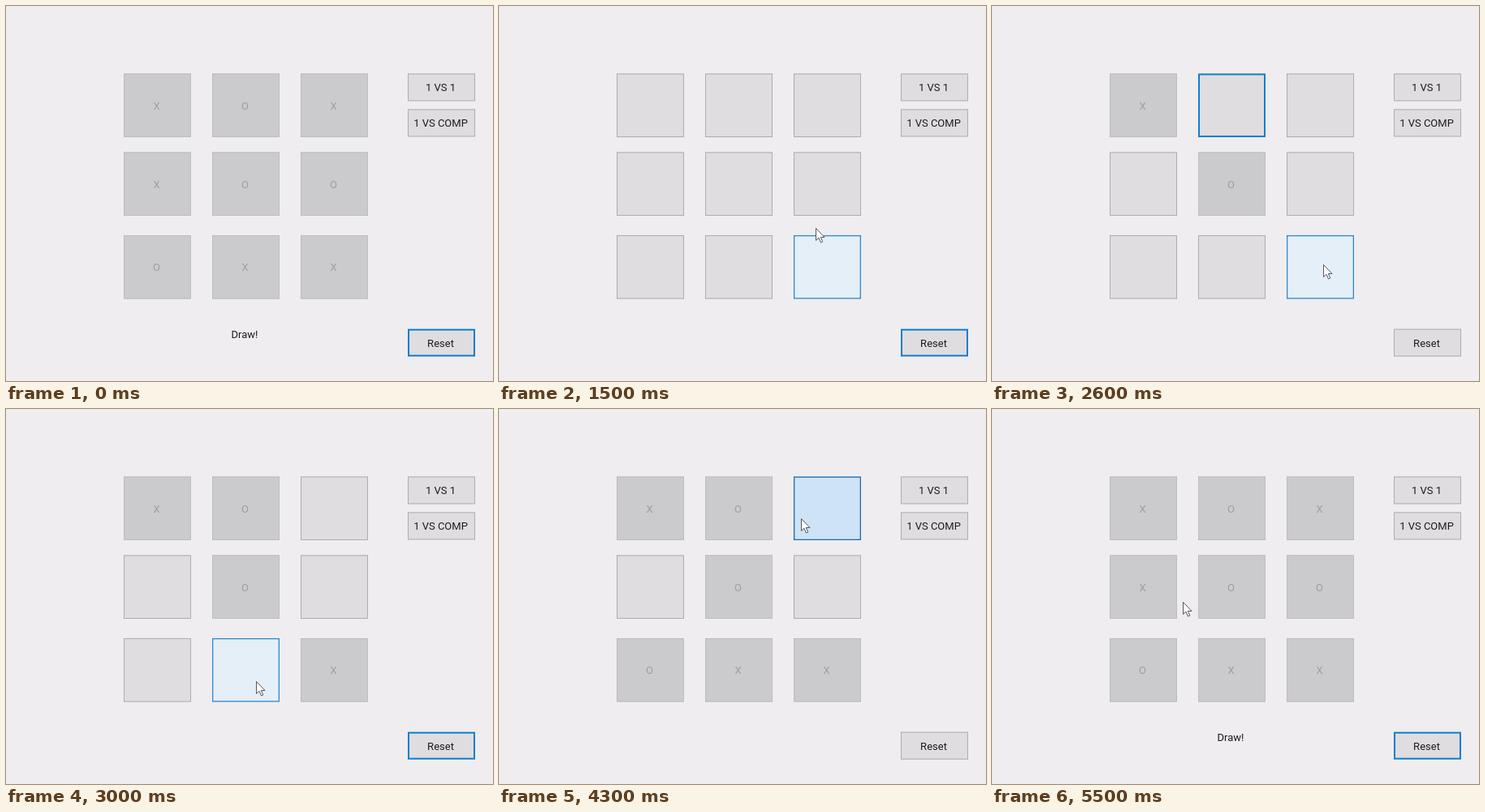
An HTML page with a canvas for the animation above (5600 ms loop, 600 by 463 pixels).

```html
<!DOCTYPE html>
<html lang="en">
<head>
<meta charset="utf-8">
<title>Tic-tac-toe</title>
<style>
  html, body { margin: 0; width: 100%; height: 100%; overflow: hidden; background: #efedef; }
  canvas { display: block; }
</style>
</head>
<body>
<canvas id="stage" width="600" height="463"></canvas>
<script>
const ctx = document.getElementById('stage').getContext('2d');
const LOOP = 5600, STEP = 100;
const POINTER_SHOWN = 700, CLEARED = 1300;
const RESET = 9;
const INK = '#1c1c1c', FADED = '#9f9ea0';

// Buttons 0-8 are the board, in tab order; Reset follows, then the two modes.
const buttons = [];
for (const y of [83.4, 180.4, 283])
  for (let col = 0; col < 3; col++)
    buttons.push({ x: 145 + 109 * col, y, w: 83, h: 78.6 });
const sideButton = (label, y) => buttons.push({ x: 495, y, w: 83, h: 34, label });
sideButton('Reset', 398.7);
sideButton('1 VS 1', 83.4);
sideButton('1 VS COMP', 127.4);

// The pointer eases to each stop; where it clicks, it stays until the release.
const stops = [
  { at: POINTER_SHOWN, x: 556, y: 383 },
  { at: 1200, x: 529, y: 420, press: 1200, button: RESET },
  { at: 1500, x: 390, y: 274 },
  { at: 1900, x: 160, y: 92, press: 2100, button: 0 },
  { at: 2600, x: 408, y: 319, press: 2700, button: 8 },
  { at: 3000, x: 308, y: 336, press: 3300, button: 7 },
  { at: 3500, x: 308, y: 336 },
  { at: 3800, x: 345, y: 300 },
  { at: 4300, x: 372, y: 135, press: 4300, button: 2 },
  { at: 5000, x: 196, y: 248, press: 5100, button: 3 },
  { at: 5500, x: 235, y: 238 }
];

const styles = {
  normal: { fill: '#dfdde0', line: '#adacae', width: 1 },
  disabled: { fill: '#cbcacc', line: '#bdbcbe', width: 1 },
  hover: { fill: '#e4eff8', line: '#2f88cc', width: 1.3 },
  pressed: { fill: '#cee3f5', line: '#1c6cab', width: 1.3 },
  focused: { fill: '#dfdde0', line: '#0f7ed0', width: 2 }
};

const lines = [0, 1, 2].flatMap(i => [[3 * i, 3 * i + 1, 3 * i + 2], [i, i + 3, i + 6]])
  .concat([[0, 4, 8], [2, 4, 6]]);

// The computer blocks a threat, else takes the centre, else the first free cell.
function replyTo(board) {
  const threat = lines.find(line =>
    line.filter(c => board[c] === 'X').length === 2 && line.some(c => !board[c]));
  if (threat) return threat.find(c => !board[c]);
  return board[4] ? board.indexOf('') : 4;
}

// Play the game once, keeping the board and focus after every click.
const clicks = [];
const board = Array(9).fill('');
for (const { press, button } of stops.filter(s => s.press)) {
  if (button !== RESET) {
    board[button] = 'X';
    const reply = replyTo(board);
    if (reply >= 0) board[reply] = 'O';
  }
  let focus = button;
  while (board[focus]) focus++;
  clicks.push({ press, button, focus, board: [...board] });
}

function pointerAt(t) {
  const i = stops.findIndex(s => s.at > t);
  if (i <= 0) return i ? stops.at(-1) : stops[0];
  const from = stops[i - 1], to = stops[i];
  const leave = from.press ? from.press + STEP : from.at;
  const k = Math.max(0, (t - leave) / (to.at - leave));
  const eased = 1 - (1 - k) ** 2;
  return {
    x: Math.round(from.x + (to.x - from.x) * eased),
    y: Math.round(from.y + (to.y - from.y) * eased)
  };
}

function drawText(text, x, baseline, color) {
  ctx.fillStyle = color;
  ctx.fillText(text, x, baseline);
}

function drawButton({ x, y, w, h, label }, state, mark) {
  const { fill, line, width } = styles[state];
  ctx.fillStyle = fill;
  ctx.fillRect(x, y, w, h);
  ctx.strokeStyle = line;
  ctx.lineWidth = width;
  ctx.strokeRect(x + width / 2, y + width / 2, w - width, h - width);
  if (label) drawText(label, x + w / 2 - 1, y + 22, INK);
  if (mark) drawText(mark, x + w / 2 - 1, y + 44.3, FADED);
}

function drawPointer({ x, y }) {
  ctx.save();
  ctx.translate(x + 0.5, y + 0.5);
  ctx.fillStyle = '#fff';
  ctx.strokeStyle = '#55555a';
  ctx.lineWidth = 1;
  const arrow = new Path2D('M0 0V15L3.5 11.8L6 17.5L8.3 16.5L5.8 11H10.5Z');
  ctx.fill(arrow);
  ctx.stroke(arrow);
  ctx.restore();
}

function render(t) {
  const click = clicks.findLast(c => c.press + STEP <= t);
  const pressed = clicks.find(c => c.press === t)?.button;
  const marks = t < CLEARED ? clicks.at(-1).board : click.board;
  const focus = pressed ?? click?.focus ?? RESET;
  // Hover highlighting trails the pointer by one step.
  const tip = pointerAt(t - STEP);

  ctx.fillStyle = '#efedef';
  ctx.fillRect(0, 0, 600, 463);
  ctx.font = '13px Roboto, sans-serif';
  ctx.textAlign = 'center';

  buttons.forEach((b, i) => {
    const over = tip.x >= b.x && tip.x < b.x + b.w && tip.y >= b.y && tip.y < b.y + b.h;
    const state = marks[i] ? 'disabled'
      : i === pressed ? 'pressed'
      : over ? 'hover'
      : i === focus ? 'focused' : 'normal';
    drawButton(b, state, marks[i]);
  });

  if (marks.every(Boolean)) drawText('Draw!', 294, 410, INK);
  if (t >= POINTER_SHOWN) drawPointer(pointerAt(t));
}

function frame() {
  const t = performance.now() % LOOP;
  render(Math.floor(t / STEP) * STEP);
  requestAnimationFrame(frame);
}
frame();
</script>
</body>
</html>
```
